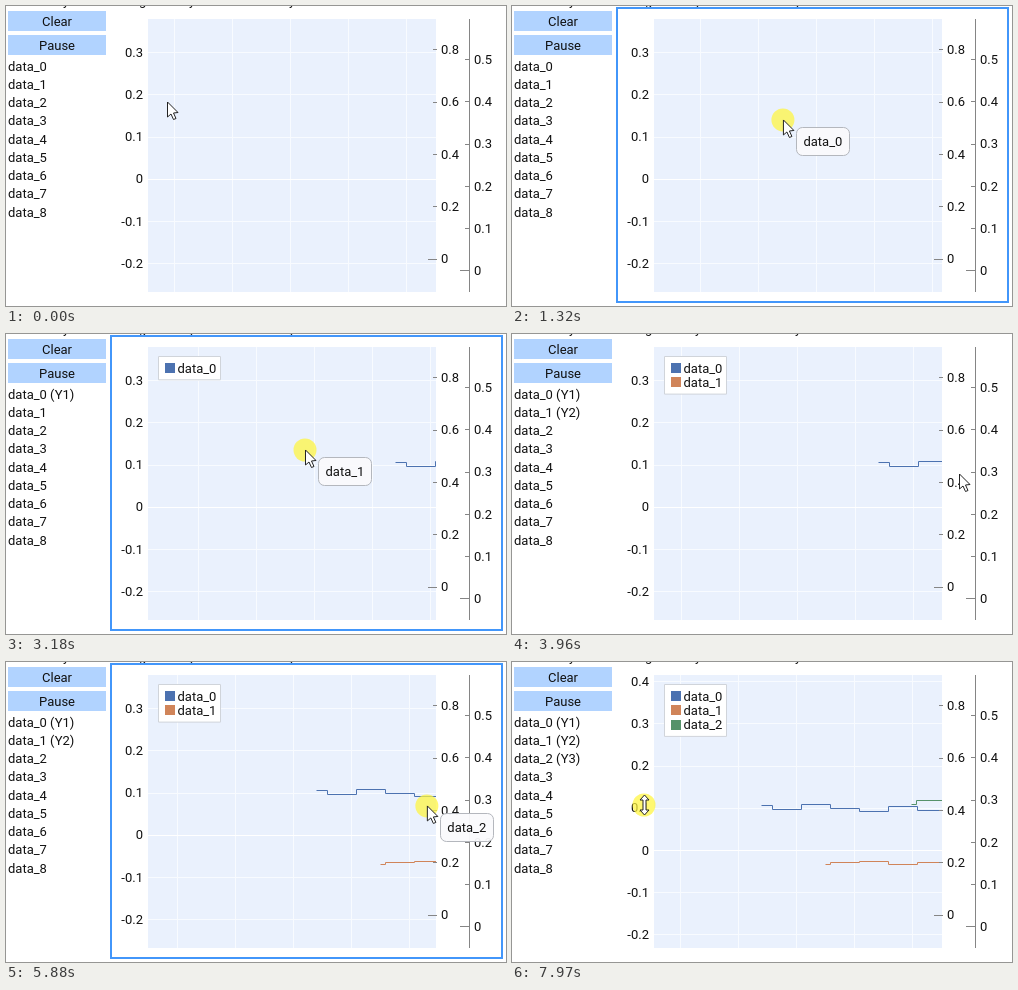
These frames come from a looping animation (500 px wide and 300 px high, 8000 ms). An HTML page with a canvas:

```html
<!DOCTYPE html>
<html lang="en">
<head>
<meta charset="utf-8">
<title>Drag and drop plot</title>
<style>
  html, body { margin: 0; width: 100%; height: 100%; overflow: hidden; background: #fff; }
  canvas { display: block; }
</style>
</head>
<body>
<canvas id="stage" width="500" height="300"></canvas>
<script>
const ctx = document.getElementById('stage').getContext('2d');
const LOOP = 8000, STEP = 77.38, SPEED = 0.0291;
const PLOT = { left: 142, top: 13, right: 430, bottom: 286 };
const ROW = 18.25, LIST_TOP = 51, LIST_WIDTH = 104;
const AXIS_DRAG = { start: 7680, y: 127.7 };

// levels are heights on screen; a series jumps to the next level about once a second
const series = [
  { color: '#4c72b0', start: 1755, edge: 2130, levels: [128, 132, 127, 131, 134, 129, 133] },
  { color: '#d08459', start: 3953, edge: 4125, levels: [202, 200, 199, 202, 200] },
  { color: '#55926a', start: 6905, edge: 7085, levels: [142, 138] }
];
const drags = [
  { from: 870, to: 1760 },
  { from: 2600, to: 3900 },
  { from: 5150, to: 6850 }
];
// time, x, y
const path = [
  [0, 161, 96], [120, 161, 96], [650, 66, 66], [930, 66, 66], [1320, 271, 114],
  [1660, 296, 128], [1780, 296, 128], [2330, 66, 79], [2680, 66, 79],
  [3500, 425, 136], [3800, 447, 140], [3970, 447, 140], [4950, 67, 103],
  [5220, 67, 103], [5950, 430, 145], [6600, 471, 149], [6890, 471, 149],
  [7560, 132, 127.7], [7700, 132, 127.7], [7970, 132, 143]
];

function pointerAt(t) {
  const i = path.findIndex(p => p[0] > t);
  if (i < 0) return path[path.length - 1].slice(1);
  const [t0, x0, y0] = path[i - 1], [t1, x1, y1] = path[i];
  const u = (t - t0) / (t1 - t0), e = u * u * (3 - 2 * u);
  return [x0 + (x1 - x0) * e, y0 + (y1 - y0) * e];
}

function rect(x, y, w, h, color) {
  ctx.fillStyle = color;
  ctx.fillRect(x, y, w, h);
}

function text(str, x, y, align = 'left') {
  ctx.fillStyle = '#111';
  ctx.textAlign = align;
  ctx.fillText(str, x, y + 4.6);
}

function polygon(points, x, y) {
  ctx.beginPath();
  points.forEach(([px, py]) => ctx.lineTo(x + px, y + py));
  ctx.closePath();
  ctx.fillStyle = '#fff';
  ctx.strokeStyle = '#222';
  ctx.lineWidth = 1;
  ctx.fill();
  ctx.stroke();
}

function panel(x, y, w, h, radius, fill, border) {
  ctx.beginPath();
  ctx.roundRect(x + 0.5, y + 0.5, w, h, radius);
  ctx.fillStyle = fill;
  ctx.strokeStyle = border;
  ctx.lineWidth = 1;
  ctx.fill();
  ctx.stroke();
}

function drawList(t, x, y, drag, pressed) {
  // descenders of the line of text cut off above
  [['y', 57], ['g', 133], ['y', 183], ['y', 283]].forEach(([c, cx]) => text(c, cx, -5.4));
  ['Clear', 'Pause'].forEach((label, i) => {
    rect(2, 5 + 24 * i, 98, 20, '#b1d3ff');
    text(label, 51, 15.4 + 24 * i, 'center');
  });
  const hovered = x < LIST_WIDTH ? Math.floor((y - LIST_TOP) / ROW) : -1;
  for (let i = 0; i < 9; i++) {
    if (i === hovered && (!pressed || i === drag)) {
      rect(0, Math.round(LIST_TOP + ROW * i), LIST_WIDTH, 18, pressed ? '#4296fa' : '#67abff');
    }
    const added = i < 3 && t >= drags[i].to;
    text(`data_${i}` + (added ? ` (Y${i + 1})` : ''), 2, 60 + ROW * i);
  }
}

function drawSeries({ color, start, edge, levels }, t, shift) {
  if (t <= start) return;
  const xAt = time => PLOT.right - (t - time) * SPEED;
  ctx.beginPath();
  levels.forEach((level, i) => {
    const from = i ? edge + 995 * (i - 1) : start;
    if (from > t) return;
    const to = Math.min(edge + 995 * i, t), y = level + 0.5 + shift;
    ctx.lineTo(Math.round(xAt(from)) + 0.5, y);
    ctx.lineTo(Math.round(xAt(to)) + 0.5, y);
  });
  ctx.strokeStyle = color;
  ctx.lineWidth = 1;
  ctx.stroke();
}

function drawRightAxis(x, zero, spacing, step, count, labelX) {
  for (let i = 0; i < count; i++) {
    const y = zero - spacing * i, length = i ? 4 : 9;
    rect(x - length, Math.round(y), length, 1, '#858585');
    text(i ? (i * step).toFixed(1) : '0', labelX, y);
  }
}

function drawPlot(t, shift) {
  const { left, top, right, bottom } = PLOT;
  rect(left, top, right - left, bottom - top, '#eaf1fd');
  ctx.save();
  ctx.beginPath();
  ctx.rect(left, top, right - left, bottom - top);
  ctx.clip();
  for (let x = 400 - (t * SPEED) % 58; x > left; x -= 58) {
    rect(Math.round(x), top, 1, bottom - top, '#f8fbff');
  }
  if ((t * SPEED) % 58 > 28) rect(Math.round(458 - (t * SPEED) % 58), top, 1, bottom - top, '#f8fbff');
  const ticks = [];
  for (let i = -3; i <= 4; i++) {
    const y = 172.7 - 42.2 * i + shift;
    if (y < top || y > bottom) continue;
    ticks.push([i, y]);
    rect(left, Math.round(y), right - left, 1, i ? '#f8fbff' : '#fff');
  }
  series.forEach((s, i) => drawSeries(s, t, i ? 0 : Math.round(shift)));
  ctx.restore();

  ticks.forEach(([i, y]) => text(i ? (i / 10).toFixed(1) : '0', 137, y, 'right'));
  drawRightAxis(431, 252.6, 52.3, 0.2, 5, 435);
  rect(463, top, 1, bottom - top, '#858585');
  drawRightAxis(463, 264.4, 42.25, 0.1, 6, 468);

  const shown = drags.filter(d => t >= d.to).length;
  if (!shown) return;
  panel(152, 22, 62, 9 + 14.3 * shown, 0, '#fff', '#d0d4da');
  for (let i = 0; i < shown; i++) {
    rect(159, Math.round(29 + 14.3 * i), 10, 10, series[i].color);
    text(`data_${i}`, 171.5, 34.2 + 14.3 * i);
  }
}

function drawPointer(x, y, pressed, resizing) {
  if (pressed) {
    ctx.beginPath();
    ctx.arc(x, y, 11.5, 0, 2 * Math.PI);
    ctx.fillStyle = 'rgba(255,245,60,.72)';
    ctx.fill();
  }
  if (resizing) {
    polygon([[0, -10], [4.5, -5], [1.5, -5], [1.5, 5], [4.5, 5],
             [0, 10], [-4.5, 5], [-1.5, 5], [-1.5, -5], [-4.5, -5]], x + 0.5, y);
  } else {
    polygon([[0, 0], [0, 15], [3.5, 12], [6, 17.5], [8.5, 16.5], [6, 11], [10.5, 10.5]], x + 0.5, y);
  }
}

function draw(now) {
  const t = Math.floor((now % LOOP + 10) / STEP) * STEP;
  const [x, y] = pointerAt(t);
  const drag = drags.findIndex(d => t >= d.from && t < d.to);
  const resizing = t >= AXIS_DRAG.start;
  const pressed = drag >= 0 || resizing;

  rect(0, 0, 500, 300, '#fff');
  ctx.font = '13px Roboto, sans-serif';
  drawList(t, x, y, drag, pressed);
  drawPlot(t, resizing ? y - AXIS_DRAG.y : 0);

  if (drag >= 0 && x > LIST_WIDTH) {
    ctx.strokeStyle = '#4296fa';
    ctx.lineWidth = 2;
    ctx.strokeRect(105, 2, 391, 294);
  }
  if (drag >= 0 && t > path.find(p => p[0] > drags[drag].from)[0]) {
    const boxX = Math.min(x + 13, 445), boxY = y + 7;
    panel(Math.round(boxX), Math.round(boxY), 53, 28, 6, 'rgba(250,250,252,.95)', '#b4b7bd');
    text(`data_${drag}`, boxX + 7.5, boxY + 14.5);
  }
  drawPointer(x, y, pressed, resizing);
}

const begin = performance.now();
function frame() {
  draw(performance.now() - begin);
  requestAnimationFrame(frame);
}
frame();
</script>
</body>
</html>
```
